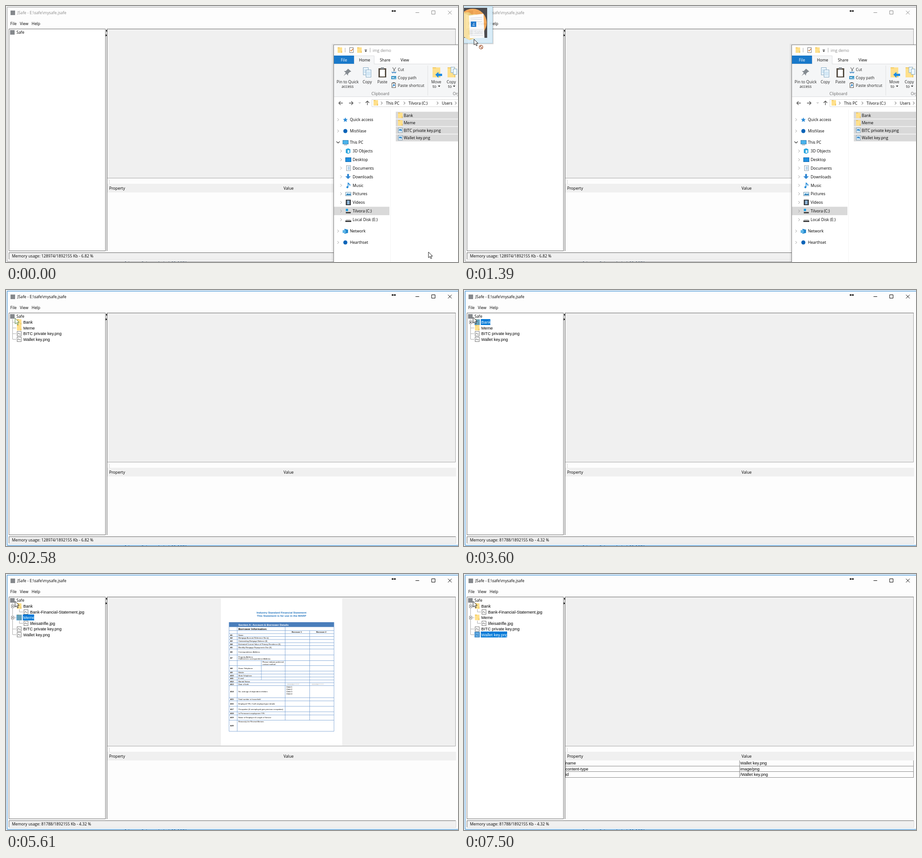
Write an HTML page that moves like this. It is 995 px wide and 563 px high and loops after 8.28 s.

```html
<!DOCTYPE html>
<html lang="en">
<head>
<meta charset="utf-8">
<title>Safe demo</title>
<style>
html, body { margin: 0; width: 100%; height: 100%; overflow: hidden; background: #fff; }
svg { display: block; width: 995px; height: 563px; }
text { font: 8.7px "Open Sans", "Noto Sans", sans-serif; white-space: pre; }
.g { font: 9.1px "Liberation Sans", sans-serif; }
.form text { font: 4.2px "Liberation Sans", sans-serif; }
.form .b { font-weight: 700; }
.form .h { font-size: 6px; font-weight: 700; }
.cap { font: 700 38px Lato, sans-serif; }
</style>
</head>
<body>
<svg id="stage" viewBox="0 0 995 563" xmlns="http://www.w3.org/2000/svg"></svg>
<script>
const LOOP = 8280;
const BLUE = '#0078d7', GREY = '#f0f0f0', DARK = '#696969';

const rect = (x, y, w, h, fill, more = '') => `<rect x="${x}" y="${y}" width="${w}" height="${h}" fill="${fill}" ${more}/>`;
const frame = (x, y, w, h, fill, stroke) => rect(x + .5, y + .5, w - 1, h - 1, fill, `stroke="${stroke}"`);
const text = (x, y, s, fill = '#000', more = '') => `<text x="${x}" y="${y}" fill="${fill}" ${more}>${s}</text>`;
const gothic = (x, y, s, fill) => text(x, y, s, fill, 'class="g"');
const line = (d, stroke = DARK, w = 1, more = '') => `<path d="${d}" fill="none" stroke="${stroke}" stroke-width="${w}" ${more}/>`;
const shape = (d, fill, more = '') => `<path d="${d}" fill="${fill}" ${more}/>`;
const dot = (x, y, r, fill) => `<circle cx="${x}" cy="${y}" r="${r}" fill="${fill}"/>`;
const group = (id, body = '') => `<g id="${id}">${body}</g>`;

const folder = (x, y, w = 10, h = 12) =>
  rect(x, y, w, h, '#ffe08c') + rect(x, y, w * .45, 1.5, '#eebf4b') + rect(x + w - 1.5, y + h * .65, 1.5, h * .35, '#e9bd50');
const logo = (x, y) => rect(x, y, 10, 10, '#85888c');
const page = (x, y, w = 9, h = 11) => frame(x, y, w, h, '#fff', '#777');
const picture = (x, y) => frame(x, y, 10, 11, '#fff', '#7797ad') + rect(x + 2, y + 3, 6, 5, '#2f86cc') + shape(`M${x + 2} ${y + 8}l2-3 4 3z`, '#cce8f8');
const chevron = (x, y, c = '#9a9a9a') => line(`M${x - 1.5} ${y - 3}l3 3-3 3`, c);
const caret = (x, y) => shape(`M${x - 2} ${y}h5l-2.5 3z`, '#222');

function mainWindow() {
  return rect(0, 0, 995, 563, '#f4f5f6') +
    text(260, 568, '4 items    1 item selected  11.4 MB', '#1e395b') +
    rect(2, 2, 993, 560, '#fdfdfd') +
    line('M995 2.5H2.5V561.5H995', '#9a9a9a', 1, 'id="edge"') +
    logo(10, 10) + text(25, 18, 'JSafe - E:\\safe\\mysafe.jsafe', '#888', 'id="title"') +
    line('M901.5 14.5h8M937 10.5h7.5v7.5H937zM973 10.5l8 8m0-8l-8 8', '#888', 1, 'id="buttons"') +
    shape('M848.5 11l3-2.6v1.9h4V8.4l3 2.6-3 2.6v-1.9h-4v1.9z', '#000') +
    text(9.5, 41.5, 'File') + text(30.5, 41.5, 'View') + text(56.5, 41.5, 'Help') +
    rect(6, 50, 214, 489, '#fff') + line('M219 50.5H6.5V538.5H219') + line('M219 50v489', '#8a8a8a', 1.3) +
    rect(220, 50, 2, 489, GREY) + line('M222.5 50v489') +
    shape('M222.5 52v5l-3-2.5zM219.5 62v5l3-2.5z', '#000') +
    rect(223, 50, 767, 329, GREY) + line('M223 50.5h767') + line('M223 378.5h766.5V51', '#a8a8a8') +
    line('M227.5 383v8', '#888', 1, 'stroke-dasharray="1 2"') +
    rect(223, 391, 768, 19, GREY) + text(227, 404, 'Property') + text(611, 404, 'Value') +
    rect(6, 542, 985, 16, GREY) + line('M990 542.5H6.5V557') + line('M7 557.5h983.5V543', '#dadada') +
    text(13, 553, '', '#000', 'id="memory"');
}

// Icon painters for the navigation pane, around a centre point
const icons = {
  star: (x, y) => shape(`M${x} ${y - 5}l1.5 3.4 3.7.3-2.8 2.5.9 3.8-3.3-2-3.3 2 .9-3.8-2.8-2.5 3.7-.3z`, '#2b8ad6'),
  disc: (x, y) => dot(x, y, 4.5, '#0a64b8'),
  screen: (x, y) => frame(x - 6, y - 5, 13, 9, '#49b3ec', '#3a83b4') + rect(x - 3, y + 5, 7, 1, '#5c7f96'),
  cube: (x, y) => shape(`M${x - 5} ${y - 4}l5-2 5 2v8l-5 2-5-2z`, '#2ca6de') + rect(x - 1, y - 2, 4, 6, '#d7f1fb'),
  desk: (x, y) => frame(x - 6, y - 5, 13, 10, '#1e8fe0', '#1467a8'),
  doc: (x, y) => frame(x - 4, y - 6, 10, 12, '#fff', '#8b9aa5') + line(`M${x - 1} ${y - 2.5}h5m-5 2.5h5m-5 2.5h5`, '#5a9fd4'),
  down: (x, y) => shape(`M${x - 2} ${y - 6}h4v5h4l-6 6-6-6h4z`, '#2f86d2'),
  note: (x, y) => line(`M${x} ${y + 3}v-9q1 3 4 4v3`, '#1e88d8', 1.6) + dot(x - 1.5, y + 4, 2.2, '#1e88d8'),
  photo: (x, y) => frame(x - 6, y - 4, 13, 9, '#d8effc', '#8ea3b0') + shape(`M${x - 5} ${y + 3}l4-4 3 2 3-2 1 4z`, '#2c7fb8'),
  film: (x, y) => frame(x - 5, y - 6, 11, 12, '#4a5866', '#222') + rect(x - 2, y - 4, 5, 8, '#8fb5d6'),
  sysdisk: (x, y) => rect(x - 5, y - 5, 5, 5, '#1b9de2') + rect(x - 5, y + 2, 11, 3, '#444'),
  disk: (x, y) => shape(`M${x - 4} ${y - 1}h9l2 3h-13z`, '#c9c9c9') + rect(x - 6, y + 2, 13, 3, '#444'),
  net: (x, y) => shape(`M${x - 2} ${y - 5}l8 2v7l-8 2z`, '#2588cc') + rect(x - 6, y - 2, 7, 6, '#5db5e8'),
};
const places = [
  ['Quick access', 250, 'star'], ['MistVase', 275, 'disc'], ['This PC', 300, 'screen'],
  ['3D Objects', 319, 'cube', 1], ['Desktop', 338, 'desk', 1], ['Documents', 356.5, 'doc', 1],
  ['Downloads', 375.5, 'down', 1], ['Music', 394.5, 'note', 1], ['Pictures', 413, 'photo', 1],
  ['Videos', 432, 'film', 1], ['Tilvora (C:)', 451, 'sysdisk', 1], ['Local Disk (E:)', 470, 'disk', 1],
  ['Network', 495, 'net'], ['Hearthset', 520, 'disc'],
];
const files = ['Bank', 'Meme', 'BITC private key.png', 'Wallet key.png'];
const fileY = i => 232.5 + i * 16.6;

function explorer() {
  let s = rect(717, 83, 290, 490, '#000', 'opacity=".05"') + rect(720, 84.5, 290, 490, '#000', 'opacity=".13"') +
    rect(722, 86, 273, 477, '#fff') + line('M721.5 563V85.5H995', '#8f8f8f') +
    folder(730, 91) + line('M746.5 92v10m55-10v10', '#aaa') +
    frame(756, 91, 9, 12, '#fff', '#777') + line('M758 97l2 2 4-5', '#e08030', 1.5) + folder(773, 91) +
    line('M789.5 96h5', '#222') + caret(791.5, 98) + text(807, 101, 'img demo', '#8a8a8a') +
    rect(722, 109, 44, 18.5, '#1979ca') + text(737, 122, 'File', '#fff') +
    rect(722, 128, 273, 72, '#f5f6f7') + line('M722 127.5h44m45 0h184M722 199.5h273', '#dcdddf') +
    rect(766, 110, 45, 19, '#f5f6f7') + line('M766.5 128v-18.5h44V128', '#dcdddf') +
    text(777, 122, 'Home') + text(823, 122, 'Share') + text(868.5, 122, 'View') +
    shape('M753 138l7 6-2 1-1 0-4 4 0 4-4-4-6 5 5-7-4-4h4l4-4z', '#858b91') +
    text(752, 170, 'Pin to Quick', '#222', 'text-anchor="middle"') + text(752, 179.5, 'access', '#222', 'text-anchor="middle"') +
    [[786, 135], [792, 140]].map(([x, y]) => frame(x, y, 12, 17, '#eef7fd', '#87abc5') + line(`M${x + 2} ${y + 5.5}h8m-8 3h8m-8 3h8`, '#9cc8e6')).join('') +
    text(785, 170, 'Copy', '#222') +
    frame(820, 137, 17, 20, '#5a5146', '#4a4238') + rect(823, 140, 11, 15, '#fff') + rect(825, 135, 7, 4, '#8a8f94') + text(817.5, 170, 'Paste', '#222') +
    line('M851 135l5 8m2-8l-5 8', '#666', 1.2) + line('M850 144.5a1.7 1.7 0 1 0 3 0m2 0a1.7 1.7 0 1 0 3 0', '#2678bd', 1.4) + text(862.5, 143, 'Cut', '#222') +
    rect(848, 154, 11, 7, '#3a94c5') + line('M850 156l1 3 1-2 1 2 1-3m1 3h3', '#fff') + text(862.5, 160.5, 'Copy path', '#222') +
    frame(849, 169, 9, 11, '#fff', '#55504a') + rect(851, 168, 5, 2, '#555') + line('M851 177l4-4m-3 0h3v3', '#1d78c1', 1.3) + text(862.5, 177.5, 'Paste shortcut', '#222') +
    text(804.5, 195.5, 'Clipboard', '#666') + line('M928.5 131v66', '#e0e1e2') +
    folder(939, 135, 17, 22) + shape('M945 151l7-6v4h8v5h-8v4z', '#1e8ae0') + text(936, 170, 'Move', '#222') + text(939, 179.5, 'to', '#222') + caret(953, 175) +
    folder(972, 135, 17, 22) + frame(979, 134, 9, 13, '#eef7fd', '#87abc5') + frame(984, 138, 9, 13, '#eef7fd', '#87abc5') + text(970, 170, 'Copy', '#222') + text(973, 179.5, 'to', '#222') + caret(986, 175) +
    text(983.5, 195.5, 'Organize', '#666') +
    line('M741.5 213.5h-9m4-4l-4 4 4 4M755 213.5h9m-4-4l4 4-4 4M795.5 218v-9m-4 4l4-4 4 4', '#555', 1.3) + line('M776.5 212l2 2 2-2', '#777') +
    line('M995 205.5H805.5v16H995', '#d9d9d9') + folder(809, 207) +
    chevron(827, 213.5, '#444') + text(836.5, 216.5, 'This PC') + chevron(877, 213.5, '#444') + text(886, 216.5, 'Tilvora (C:)') +
    chevron(950, 213.5, '#444') + text(959.5, 216.5, 'Users') + chevron(990, 213.5, '#444') +
    line('M846.5 228v335', '#f3f3f3') + rect(722, 441.5, 122, 18.5, '#d9d9d9');
  for (const [name, y, icon, deep = 0] of places) {
    s += name === 'This PC' ? line(`M727.5 ${y - 2}l3.5 3.5 3.5-3.5`, '#333', 1.2) : chevron(731 + deep * 6.5, y);
    s += icons[icon](747 + deep * 6, y) + text(757 + deep * 6, y + 3, name);
  }
  files.forEach((name, i) => {
    const y = fileY(i);
    s += rect(858, y, 137, 15.4, '#d9d9d9', `id="file${i}"`) +
      (i < 2 ? folder(863, y + 2) : picture(863, y + 2)) + text(875.5, y + 11, name);
  });
  return s;
}

function statement() {
  const rows = [
    ['A1', 'Name', 137.5], ['A2', 'Mortgage Account Reference No (s)', 144], ['A3', 'Outstanding Mortgage Balance (€)', 151],
    ['A4', 'Estimated Current Value of Primary Residence (€)', 157.5], ['A5', 'Monthly Mortgage Repayments Due (€)', 165],
    ['A6', 'Correspondence Address', 178], ['A7', 'Property Address', 190.5], ['', '', 201.5], ['A8', 'Home Telephone', 213.5],
    ['A9', 'Mobile', 220], ['A10', 'Work Telephone', 226.5], ['A11', 'E-mail', 233], ['A12', 'Marital Status', 239],
    ['A13', 'Date of birth', 245.5], ['A14', 'No. and age of dependent children', 272], ['A15', 'Total number in household', 279],
    ['A16', 'Employed Y/N, if self-employed give details', 291], ['A17', 'Occupation (if unemployed give previous occupation)', 303],
    ['A18', 'In Permanent employment Y/N', 310], ['A19', 'Name of Employer &amp; Length of Service', 321.5],
    ['A20', '', 346],
  ];
  const bold = 'class="b"', head = 'class="h"', mid = 'class="h" text-anchor="middle"';
  let s = rect(473, 53, 267, 324, '#fff') +
    text(606.5, 86.5, 'Industry Standard Financial Statement', '#2173bd', mid) +
    text(606.5, 94, 'This Statement is for use in the MARP', '#2173bd', mid) +
    rect(491, 106, 231, 10.5, '#4a7ebb') + text(511.5, 113.5, 'Section A: Account &amp; Borrower Details', '#fff', head) +
    text(511.5, 122.5, 'Borrower Information:', '#000', head) +
    text(629, 129, 'Borrower 1', '#000', bold) + text(683, 129, 'Borrower 2', '#000', bold);
  let top = 131, grid = 'M491 124.5h231M491 131h231';
  for (const [id, label, end] of rows) {
    const y = (top + end) / 2 + 1.5;
    s += text(493.5, y, id, '#000', bold) + text(511.5, id === 'A7' ? y - 2 : y, label);
    grid += `M491 ${end}h231`;
    top = end;
  }
  s += text(511.5, 188, 'If different to correspondence Address') + text(511.5, 326, 'Reason(s) for Review/ Arrears') +
    text(564.5, 195, 'Please indicate preferred', '#000', 'font-style="italic"') + text(564.5, 199.5, 'contact method', '#000', 'font-style="italic"') +
    text(619, 243.5, 'DD/MM/YYYY', '#aaa') + text(673, 243.5, 'DD/MM/YYYY', '#aaa');
  for (let i = 0; i < 4; i++) s += text(617, 249.5 + i * 5.3, 'Child ' + (i + 1));
  return `<g class="form">${s}${line(grid + 'M491 106v240M509 116v230M614.5 116v206M668.5 124v198M722 106v240M562 190v43', '#6f9bd0', .8)}</g>`;
}

const previews = {
  none: '',
  form: statement(),
  meme: rect(317, 52, 579, 326, '#fff') + '<ellipse cx="606" cy="187" rx="108" ry="134" fill="#231f20"/>' +
    text(611, 371, 'LIFE IS A TRIFLE', '#231f20', 'class="cap" text-anchor="middle"'),
  coin: dot(606.5, 215, 160, '#f7931a'),
};

const dragImage =
  rect(-39, -71, 82, 82, '#000', 'opacity=".18"') + frame(-41, -73, 82, 82, '#d5ebf7', '#a9d3e8') +
  rect(-37, -69, 66, 66, '#39393d') + dot(-3, -36, 31, '#f3a24a') +
  shape('M-24-59h14l4 4h10v52l-14 5-14-8z', '#f0cf78') +
  shape('M-12-52l33-4 2 53-35 1z', '#fbfbfb') +
  line('M-8-46l26-2M-8-42l26-2M-8-38l26-1M-8-20h28M-8-16h28M-8-12h28M-8-8h28', '#c5cdd6') +
  shape('M-24-58l13 6 2 54-15-9z', '#fbe29c') +
  rect(-7, -39, 12, 12, '#0e6fcb') + text(-1, -29.5, '4', '#fff', 'text-anchor="middle" font-weight="700"');
const noDrop = '<circle cx="15.5" cy="17.5" r="4" fill="#fff" stroke="#a0522d" stroke-width="1.3"/>' + line('M12.7 14.7l5.6 5.6', '#a0522d', 1.3);
const arrow = shape('M0 0v12.6l3-2.7 2.1 4.7 2-.9-2.1-4.6h4z', '#fff', 'id="arrow" stroke="#000" stroke-width=".9"');

const stage = document.getElementById('stage');
stage.innerHTML = mainWindow() + ['preview', 'props', 'bar', 'tree'].map(id => group(id)).join('') +
  group('explorer', explorer()) + group('drag', dragImage) + group('cursor', arrow + group('badge', noDrop));
const $ = id => document.getElementById(id);

// Rewrites a group only when its markup changes
const cache = {};
const fill = (id, html) => { if (cache[id] !== html) $(id).innerHTML = cache[id] = html; };
const show = (id, on) => $(id).setAttribute('display', on ? 'inline' : 'none');
const since = (t, list) => list.reduce((v, [at, x]) => t >= at ? x : v, null);

const doc1 = 'Bank-Financial-Statement.jpg', doc2 = 'lifeisatrifle.jpg';
const selection = [[2810, 'Safe'], [3600, 'Bank'], [4300, doc1], [5150, 'Meme'], [5930, doc2], [6630, files[2]], [7410, files[3]]];
const shown = [[0, 'none'], [4460, 'form'], [6090, 'meme'], [6720, 'coin'], [7500, 'none']];
const loads = [[4300, 4460], [5930, 6090], [6630, 6720], [7410, 7500]];
const paths = { [doc1]: '/Bank/', [doc2]: '/Meme/', [files[2]]: '/', [files[3]]: '/' };
const labelWidth = { Safe: 20, Bank: 21, Meme: 25, [doc1]: 121, [doc2]: 58, [files[2]]: 84, [files[3]]: 58 };

function tree(t, sel) {
  const rows = [['Safe', 0]];
  if (t >= 2500) {
    rows.push(['Bank', 1, t >= 3600, t >= 3900]);
    if (t >= 3900) rows.push([doc1, 2]);
    rows.push(['Meme', 1, t >= 5150, t >= 5610]);
    if (t >= 5610) rows.push([doc2, 2]);
    rows.push([files[2], 1], [files[3], 1]);
  }
  let s = rows.length > 1 ? line(`M14.5 64V${58 + 12.5 * (rows.length - 1)}`, '#aaa') : '';
  rows.forEach(([name, depth, box, open], i) => {
    const y = 58 + 12.5 * i, x = 9 + 15 * depth, on = name === sel;
    if (depth) s += line(`M${x - 9.5} ${y + .5}h8${depth > 1 ? 'm-8 0v-6' : ''}`, '#aaa');
    if (box) s += frame(11, y - 3, 7, 7, '#fff', '#888') + line(`M13 ${y + .5}h3` + (open ? '' : `M14.5 ${y - 1}v3`), '#000');
    s += depth === 0 ? logo(x, y - 5) : name in paths
      ? page(x, y - 5, 10, 11) + line(`M${x + 2} ${y + 2}l2-3 2 3 2-1`, '#666') : folder(x, y - 6, 10, 12);
    if (on) s += rect(x - 1, y - 6, 12, 12.5, BLUE, 'opacity=".6"') + rect(x + 13, y - 6.5, labelWidth[name], 13, BLUE);
    s += name === 'Safe' ? text(23, y + 3, name, on ? '#fff' : '#000') : gothic(x + 14, y + 3.5, name, on ? '#fff' : '#000');
  });
  return s;
}

function properties(name) {
  if (!(name in paths)) return '';
  const rows = [['name', name], ['content-type', 'image/' + name.slice(-3)], ['id', paths[name] + name]];
  return rows.map(([key, value], i) => gothic(223.5, 419 + i * 12.6, key) + gothic(608, 419 + i * 12.6, value)).join('') +
    line('M223 422.5h767M223 434.5h767M223 447.5h767M223.5 410v38M606.5 410v38M989.5 410v38', '#8a8a8a');
}

function progress(t) {
  const run = loads.find(([a, b]) => t >= a && t < b);
  if (!run) return '';
  return frame(875, 544, 115, 12, '#e6e6e6', '#bcbcbc') + rect(877 + 7 * Math.floor((t - run[0]) / 80), 545, 5, 9, '#26b843');
}

const track = [[70, 930, 541], [520, 925, 239], [669, 925, 239], [670, 885, 228], [750, 745, 200], [910, 449, 153],
  [1070, 215, 112], [1230, 82, 86], [1390, 22, 73], [1470, 33, 66], [1560, 31, 66], [1940, 20, 62], [2810, 20, 62], [2811, 20, 60], [LOOP, 20, 60]];
function pointer(t) {
  if (t < 70) return track[0].slice(1);
  if (t < 520) t = 70 + 64.3 * (Math.floor((t - 70) / 75) + 1);
  else if (t >= 670 && t < 1560) t = 670 + 80 * Math.floor((t - 670) / 80);
  else if (t >= 1560 && t < 1940) t = 1560 + 76 * Math.floor((t - 1560) / 76);
  const i = Math.max(1, track.findIndex(k => k[0] >= t));
  const [a, x0, y0] = track[i - 1], [b, x1, y1] = track[i];
  const k = (t - a) / (b - a);
  return [x0 + (x1 - x0) * k, y0 + (y1 - y0) * k];
}

function render(t) {
  const active = t >= 2180, sel = since(t, selection);
  const [x, y] = pointer(t).map(Math.round);
  $('edge').setAttribute('stroke', active ? '#1c7fcf' : '#9a9a9a');
  $('title').setAttribute('fill', active ? '#000' : '#888');
  $('buttons').setAttribute('stroke', active ? '#000' : '#888');
  fill('memory', 'Memory usage: ' + (t < 3200 ? '128974/1892155 Kb - 6.82 %' : '81788/1892155 Kb - 4.32 %'));
  fill('preview', previews[since(t, shown)]);
  fill('props', properties(sel));
  fill('bar', progress(t));
  fill('tree', tree(t, sel));
  show('explorer', !active);
  files.forEach((_, i) => {
    const over = t < 670 && y >= fileY(i) && y < fileY(i) + 16.6;
    $('file' + i).setAttribute('fill', over ? '#cce8ff' : '#d9d9d9');
  });
  show('drag', t >= 670 && t < 2440);
  $('drag').setAttribute('opacity', active ? Math.max(0, .9 * (1 - (t - 2180) / 260)) : .9);
  $('drag').setAttribute('transform', `translate(${x} ${y})`);
  $('cursor').setAttribute('transform', `translate(${x} ${y})`);
  $('arrow').setAttribute('stroke', t >= 2180 && t < 2810 ? '#3f7020' : '#000');
  show('badge', t >= 670 && t < 1560);
}

const start = performance.now();
function tick() {
  render((performance.now() - start) % LOOP);
  requestAnimationFrame(tick);
}
tick();
</script>
</body>
</html>
```
